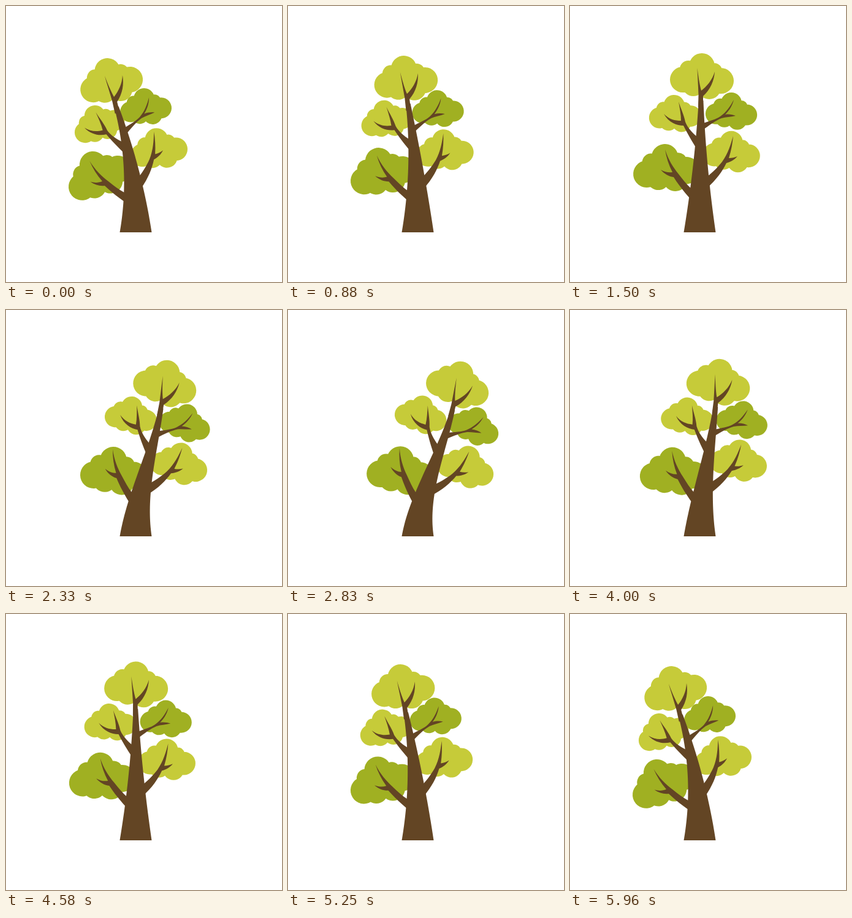
An HTML page with a canvas that plays this animation: 450x450 px, repeating every 6000 ms.

```html
<!DOCTYPE html>
<html lang="en">
<head>
<meta charset="utf-8">
<title>Swaying tree</title>
<style>
  html, body { margin: 0; width: 100%; height: 100%; overflow: hidden; background: #fff; }
  canvas { display: block; }
</style>
</head>
<body>
<canvas id="stage" width="450" height="450"></canvas>
<script>
const ctx = document.getElementById('stage').getContext('2d');
const LOOP = 6000, GROUND = 369, TOP = 215, RAD = Math.PI / 180;
const LIGHT = '#c6cb39', DARK = '#a0b022', BROWN = '#634524';

// Leaf puffs [x, y, radius] around the middle of a cloud.
const PUFFS = [
  [0, -17, 21], [-31, 5, 21], [31, 7, 21], [-22, -12, 14],
  [20, -9, 13], [-14, 14, 18], [12, 18, 19], [0, 0, 28]
];

// A branch is drawn upright and grows from the trunk at a height.
// Its cloud has a pose [x, y, degrees] upright, fully left and fully right.
const LIMBS = [
  { color: LIGHT, size: 1, height: 219,
    rest: [215, 115, 0], left: [170.4, 122.3, -17], right: [278.8, 121.5, 13],
    branch: 'M207.5 101C209 113 211 127 214 138C223 131 232 121 236 107C235 122 229 136 217 147L217 165L209 165L209.5 145C209 130 208 116 207.5 101Z' },
  { color: LIGHT, size: .82, height: 147,
    rest: [171, 176, -5], left: [150.7, 191.9, -24], right: [217.9, 170.4, 9],
    branch: 'M177 156C181 168 186 178 188 189C192 199 200 207 207 213L210 238C201 224 194 213 185 195C174 195 161 190 153 176C162 185 171 187 181 187C181 177 179 167 177 156Z' },
  { color: DARK, size: .81, height: 176,
    rest: [263, 171.8, 0], left: [227.3, 164.6, -9], right: [304.6, 189.1, 17],
    branch: 'M267 153C264 165 258 172 253 177C259 176 265 177 270 179C262 181 254 181 247 183C237 187 229 193 214 204L215 192C228 187 238 185 245 180C255 173 261 164 267 153Z' },
  { color: LIGHT, size: .9, height: 81,
    rest: [263, 238, 0], left: [248.5, 233, -12], right: [291, 255.7, 13],
    branch: 'M266 212C265 224 263 235 259 248C264 248 269 247 273 245C268 251 262 254 255 256C248 270 240 282 222 298L218 282C230 274 240 264 248 254C258 240 262 226 266 212Z' },
  { color: DARK, size: 1.05, height: 63,
    rest: [156.8, 264.8, -7], left: [150.3, 274.8, -28], right: [183.4, 262.1, 1],
    branch: 'M155 234C160 250 168 263 177 274C184 283 190 291 198 298L203 322C194 312 181 298 169 279C161 278 154 274 148 267C155 271 161 272 167 271C161 259 157 247 155 234Z' }
];
for (const limb of LIMBS) limb.path = new Path2D(limb.branch);

// Sway runs from -1 (left) through 0 (upright) to 1 (right).
function swayAt(t) {
  const c = Math.cos(2 * Math.PI * t / LOOP);
  return -.8 * c - .2 * c ** 3;
}

// Middle of the trunk: it curls to the left, but leans in an S to the right.
function spine(h, sway) {
  const u = h / 277;
  const bend = sway < 0 ? .00073 * h * h : 64 * u * u * (3 - 2 * u);
  return [211.5 + .01 * h + sway * bend, GROUND - h + .045 * h * Math.abs(sway)];
}

const halfWidth = h => 26 - .155 * h + .00024 * h * h;

function drawCloud({ color, size, rest, left, right }, sway) {
  const end = sway < 0 ? left : right;
  const [x, y, turn] = rest.map((v, i) => v + (end[i] - v) * Math.abs(sway));
  ctx.save();
  ctx.translate(x, y);
  ctx.rotate(turn * RAD);
  ctx.scale(size, size);
  ctx.fillStyle = color;
  ctx.beginPath();
  for (const [px, py, r] of PUFFS) {
    ctx.moveTo(px + r, py);
    ctx.arc(px, py, r, 0, 2 * Math.PI);
  }
  ctx.fill();
  ctx.restore();
}

function drawBranch({ height, path }, sway) {
  const [x0, y0] = spine(height, 0);
  ctx.save();
  ctx.translate(...spine(height, sway));
  ctx.rotate(14 * sway * RAD);
  ctx.translate(-x0, -y0);
  ctx.fill(path);
  ctx.restore();
}

function drawTrunk(sway) {
  const edge = (h, side) => {
    const [x, y] = spine(h, sway);
    ctx.lineTo(x + side * halfWidth(h), y);
  };
  ctx.beginPath();
  for (let h = 0; h <= TOP; h += 5) edge(h, -1);
  for (let h = TOP; h >= 0; h -= 5) edge(h, 1);
  ctx.fill();
}

function draw(t) {
  const sway = swayAt(t);
  ctx.clearRect(0, 0, 450, 450);
  for (const limb of LIMBS) drawCloud(limb, sway);
  ctx.fillStyle = BROWN;
  for (const limb of LIMBS) drawBranch(limb, sway);
  drawTrunk(sway);
}

let start;
function tick(now) {
  start ??= now;
  draw(now - start);
  requestAnimationFrame(tick);
}
draw(0);
requestAnimationFrame(tick);
</script>
</body>
</html>
```
